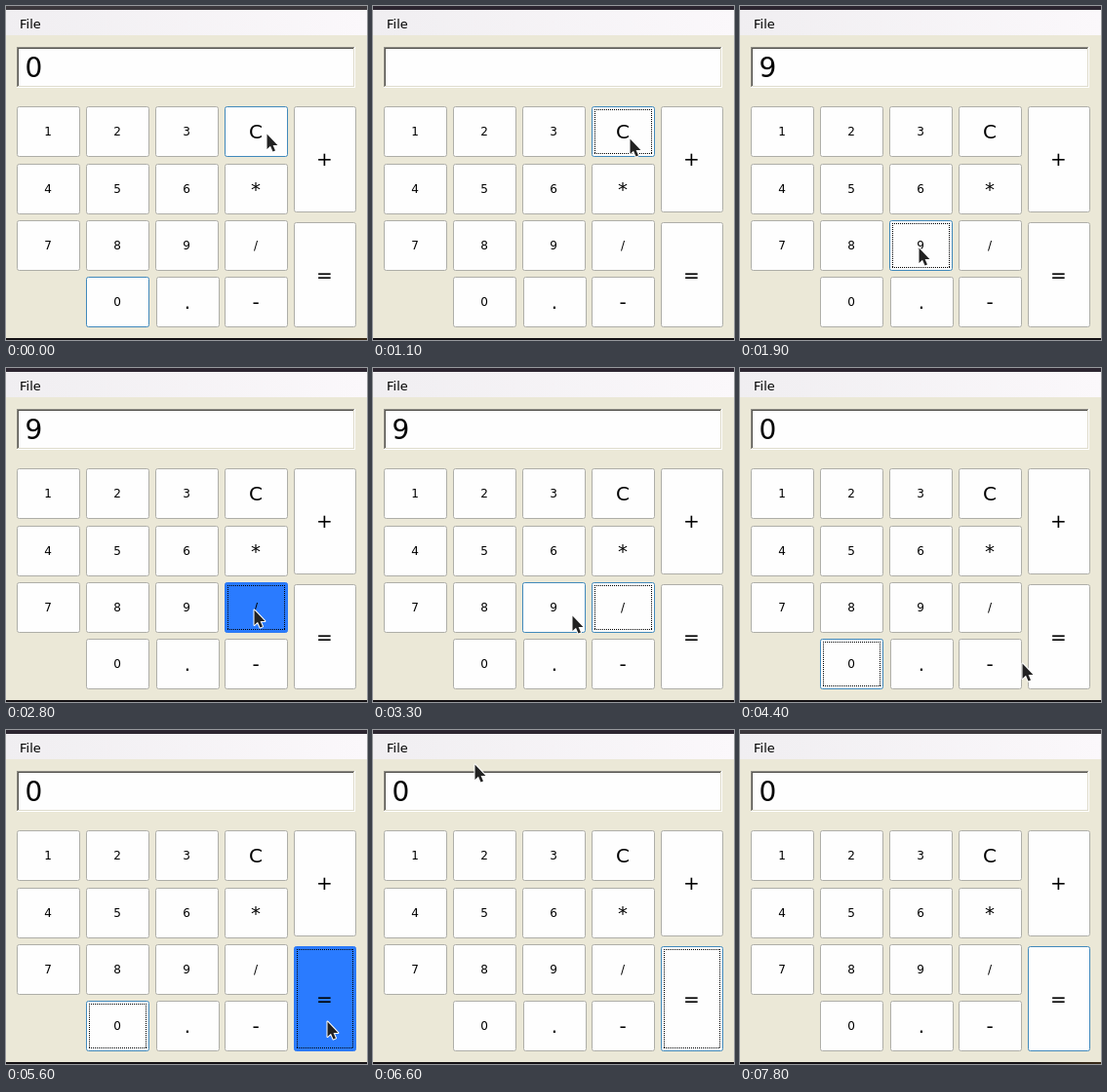
Animation of 370 by 343 pixels, one loop 7.9 s. Source, as an HTML page with a canvas:

```html
<!DOCTYPE html>
<html lang="en">
<head>
<meta charset="utf-8">
<title>Calculator</title>
<style>
  html, body { margin: 0; width: 100%; height: 100%; overflow: hidden; background: #ebe8d7; }
  canvas { display: block; width: 370px; height: 343px; }
</style>
</head>
<body>
<canvas id="stage" width="370" height="343"></canvas>
<script>
const ctx = document.getElementById('stage').getContext('2d');
const LOOP = 7900;
const FONT = '"DejaVu Sans", sans-serif';
const COLS = [11, 82, 153, 224, 295];
const ROWS = [103, 162, 220, 278];

const buttons = [];
['123C', '456*', '789/', ' 0.-'].forEach((row, r) => {
  [...row].forEach((label, c) => {
    if (label === ' ') return;
    const x = COLS[c] + (label === '.' ? 1 : 0);
    buttons.push({ label, x, y: ROWS[r], w: 65, h: 52 });
  });
});
buttons.push({ label: '+', x: COLS[4], y: 103, w: 64, h: 109 });
buttons.push({ label: '=', x: COLS[4], y: 222, w: 64, h: 108 });

// Each step changes only the listed parts of the state.
const steps = [
  [0, { text: '0', focus: '0', hover: 'C', press: '', active: false, cursor: [267, 131] }],
  [500, { active: true, press: 'C' }],
  [600, { focus: 'C' }],
  [700, { press: '', text: '', cursor: [267, 132] }],
  [1100, { cursor: [263, 136] }],
  [1300, { hover: '9', cursor: [206, 234] }],
  [1400, { cursor: [183, 248] }],
  [1700, { focus: '' }],
  [1900, { focus: '9', text: '9' }],
  [2300, { hover: '/', cursor: [231, 249] }],
  [2400, { cursor: [254, 248] }],
  [2800, { focus: '/', press: '/' }],
  [2900, { press: '' }],
  [3300, { hover: '9', cursor: [204, 254] }],
  [3400, { hover: '8', cursor: [136, 266] }],
  [3500, { hover: '0', cursor: [118, 306] }],
  [3700, { focus: '0', press: '0' }],
  [3900, { press: '', text: '0' }],
  [4200, { hover: '.', cursor: [166, 306] }],
  [4300, { hover: '-', cursor: [244, 304] }],
  [4400, { hover: '', cursor: [289, 303] }],
  [4500, { hover: '=', cursor: [312, 300] }],
  [4600, { cursor: [324, 299] }],
  [4700, { cursor: [329, 299] }],
  [5600, { press: '=' }],
  [5800, { press: '', focus: '=' }],
  [6100, { hover: '', cursor: [220, 90] }],
  [6200, { cursor: [132, 53] }],
  [6600, { cursor: [104, 35] }],
  [6700, { cursor: [66, 10] }],
  [6800, { cursor: null }],
  [7800, { active: false }]
];

function stateAt(t) {
  const state = {};
  for (const [start, change] of steps) if (start <= t) Object.assign(state, change);
  return state;
}

function rect(x, y, w, h, color) {
  ctx.fillStyle = color;
  ctx.fillRect(x, y, w, h);
}

function gradient(x0, x1, ...colors) {
  const g = ctx.createLinearGradient(x0, 0, x1, 0);
  colors.forEach((c, i) => g.addColorStop(i / (colors.length - 1), c));
  return g;
}

function write(text, x, y, size, align = 'left') {
  ctx.font = size + 'px ' + FONT;
  ctx.textAlign = align;
  ctx.fillStyle = '#000';
  ctx.fillText(text, x, y);
}

function drawWindow(s) {
  rect(0, 0, 370, 343, '#ebe8d7');
  rect(0, 0, 370, 4, s.active ? '#2c2530' : '#3c383d');
  rect(0, 4, 370, 26, gradient(0, 370, '#f0eef1', '#fbf8fb'));
  write('File', 14, 23, 13);
  rect(0, 341, 370, 2, s.active ? '#141114' : gradient(300, 370, '#141114', '#3a2c18'));
}

function drawDisplay(text) {
  rect(11, 42, 347, 42, '#fff');
  rect(11, 42, 346, 41, '#8f8d86');
  rect(12, 43, 345, 40, '#dedbcb');
  rect(12, 43, 344, 39, '#55544f');
  rect(13, 44, 343, 38, '#fefefe');
  write(text, 19.5, 73, 28);
}

function drawDots(x, y, w, h) {
  ctx.fillStyle = '#000';
  for (let i = 0; i < w; i += 2) {
    ctx.fillRect(x + i, y, 1, 1);
    ctx.fillRect(x + i, y + h - 1, 1, 1);
  }
  for (let i = 0; i < h; i += 2) {
    ctx.fillRect(x, y + i, 1, 1);
    ctx.fillRect(x + w - 1, y + i, 1, 1);
  }
}

function drawButton({ label, x, y, w, h }, s) {
  const pressed = s.press === label;
  const focused = s.focus === label;
  const lit = focused || s.hover === label;
  ctx.beginPath();
  ctx.roundRect(x + 0.5, y + 0.5, w - 1, h - 1, 2);
  ctx.fillStyle = pressed ? '#2a7bff' : '#fefefe';
  ctx.fill();
  ctx.lineWidth = 1;
  ctx.strokeStyle = pressed ? '#2a78f4' : lit ? '#4189bb' : '#aeaea8';
  ctx.stroke();
  if (pressed || (focused && s.active)) drawDots(x + 3, y + 3, w - 6, h - 6);
  const size = /[\d/]/.test(label) ? 12 : 20;
  write(label, x + w / 2 - 0.5, Math.round(y + h / 2 + size * 0.346), size, 'center');
}

function drawCursor([x, y]) {
  const arrow = new Path2D('M0.5 0.5V16L4 12.8L6.5 18.5L9 17.4L6.6 11.9H11.4Z');
  ctx.save();
  ctx.translate(x, y);
  ctx.lineJoin = 'round';
  ctx.lineWidth = 2;
  ctx.strokeStyle = '#fff';
  ctx.stroke(arrow);
  ctx.fillStyle = '#222';
  ctx.fill(arrow);
  ctx.restore();
}

function draw(t) {
  const s = stateAt(t);
  drawWindow(s);
  drawDisplay(s.text);
  buttons.forEach(b => drawButton(b, s));
  if (s.cursor) drawCursor(s.cursor);
}

const began = performance.now();
function tick() {
  draw((performance.now() - began) % LOOP);
  requestAnimationFrame(tick);
}
tick();
</script>
</body>
</html>
```
